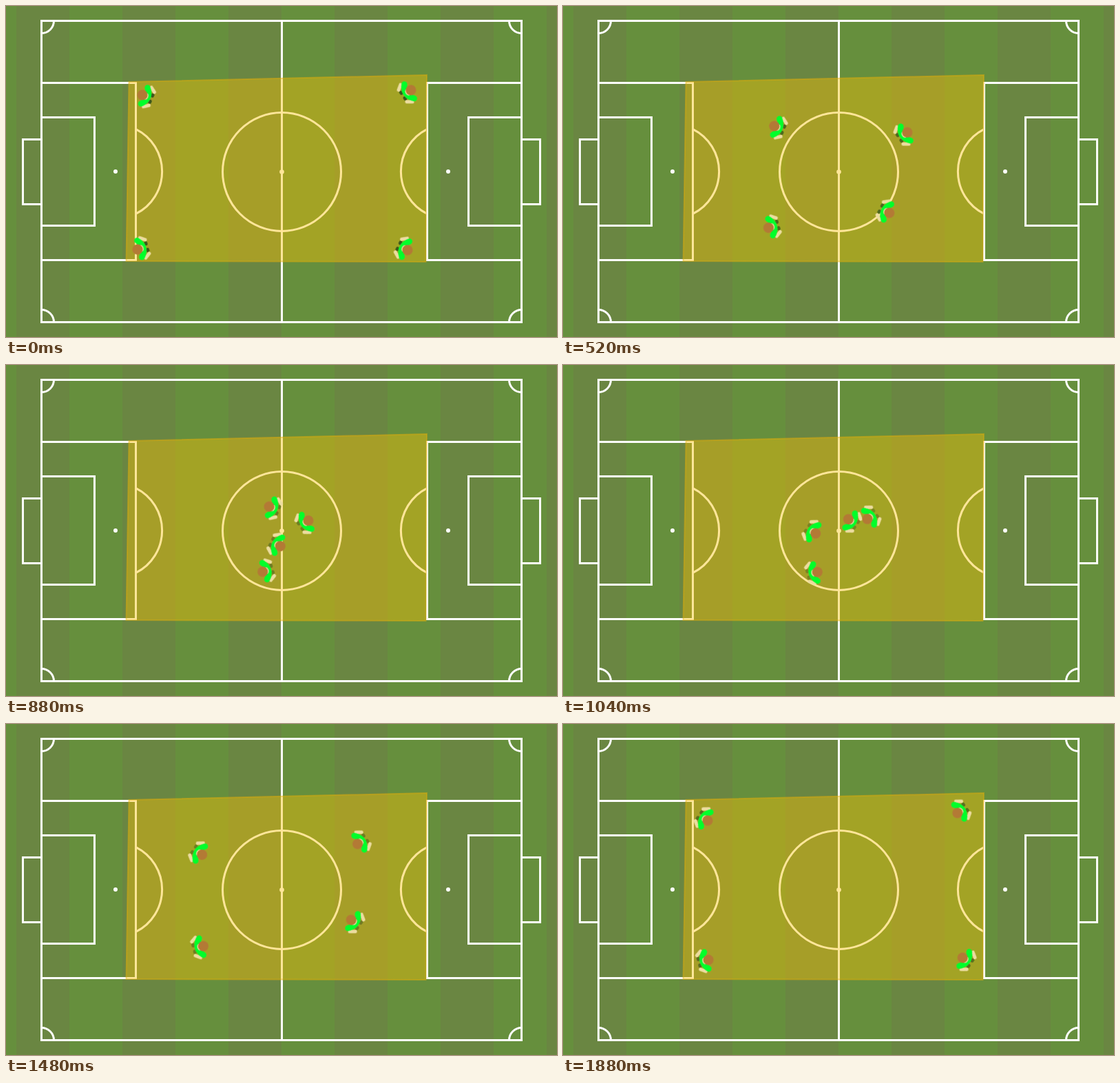
Recreate the animation shown at these times as an HTML page. Size 800 by 480 pixels, loop 1920 ms.

```html
<!DOCTYPE html>
<html lang="en">
<head>
<meta charset="utf-8">
<title>Crossing drill</title>
<style>
  html, body { margin: 0; width: 100%; height: 100%; overflow: hidden; background: #668f3d; }
  svg { display: block; width: 800px; height: 480px; }
  .lines { fill: none; stroke: #fff; stroke-width: 3; }
  .spots { fill: #fff; }
  .zone { fill: rgb(255 193 0 / .4); stroke: rgb(225 170 10 / .45); stroke-width: 2; }

  /* Each runner goes from --a to --b, then from --b to --c, 40 ms per step. */
  .runner { animation: run 1920ms steps(24) infinite; }
  @keyframes run {
    0%      { transform: translate(var(--a)) rotate(var(--r1)); }
    49.999% { transform: translate(var(--b)) rotate(var(--r1)); }
    50%     { transform: translate(var(--b)) rotate(var(--r2)); }
    100%    { transform: translate(var(--c)) rotate(var(--r2)); }
  }
  .feet { fill: #1f4519; animation: stride 640ms steps(8) infinite; }
  @keyframes stride {
    0%, 100% { opacity: .9; }
    50%      { opacity: .25; }
  }
  .arms { fill: none; stroke: #ecdca0; stroke-width: 5; stroke-linecap: round; }
  .shirt { fill: none; stroke: #00ff2a; stroke-width: 8.5; stroke-linecap: round; }
  .neck { fill: #ecdca0; }
  .head { fill: #b37a35; }

  .p1 { --a: 195.7px, 128px;   --b: 396.5px, 211.3px; --c: 586px, 343px;     --r1: 22.5deg;   --r2: 34.8deg; }
  .p2 { --a: 590px, 120.6px;   --b: 427.5px, 233.7px; --c: 577px, 126px;     --r1: 145.2deg;  --r2: -35.8deg; }
  .p3 { --a: 188.6px, 353.7px; --b: 386.8px, 295.6px; --c: 206px, 343.4px;   --r1: -16.3deg;  --r2: 165.2deg; }
  .p4 { --a: 585.2px, 355.1px; --b: 383.7px, 255.5px; --c: 204.6px, 136.4px; --r1: -153.7deg; --r2: -146.4deg; }
</style>
</head>
<body>
<svg viewBox="0 0 800 480">
  <defs>
    <pattern id="grass" x="15" width="154" height="480" patternUnits="userSpaceOnUse">
      <rect width="154" height="480" fill="#668f3d"/>
      <rect width="77" height="480" fill="#6a8642"/>
    </pattern>
    <g id="half">
      <path d="M51.5 111.5H188.5V368.5H51.5M51.5 161.5H128.5V318.5H51.5M51.5 193.5H24.5V287.5H51.5"/>
      <path d="M188.5 178.6A68.5 68.5 0 0 1 188.5 301.4"/>
      <path d="M69.5 21.5A18 18 0 0 1 51.5 39.5M51.5 440.5A18 18 0 0 1 69.5 458.5"/>
    </g>
    <g id="player">
      <g class="feet">
        <ellipse cx="16.5" cy="-5" rx="2.4" ry="3.2"/>
        <ellipse cx="16.5" cy="5" rx="2.4" ry="3.2"/>
      </g>
      <path class="arms" d="M10.5 -15L17 -10.5M10.5 15L17 10.5"/>
      <path class="shirt" d="M5.5 -12.5Q16.5 0 5.5 12.5"/>
      <ellipse class="neck" cx="8" rx="3.5" ry="5"/>
      <circle class="head" cx="2.5" r="7.6"/>
    </g>
  </defs>

  <rect width="800" height="480" fill="url(#grass)"/>
  <g class="lines">
    <rect x="51.5" y="21.5" width="697" height="437"/>
    <path d="M400.5 21.5V458.5"/>
    <circle cx="400.5" cy="240.5" r="86"/>
    <use href="#half"/>
    <use href="#half" transform="matrix(-1 0 0 1 800 0)"/>
  </g>
  <g class="spots">
    <circle cx="159" cy="240" r="3"/>
    <circle cx="400.5" cy="240.5" r="3.3"/>
    <circle cx="642" cy="240" r="3"/>
  </g>
  <path class="zone" d="M178.5 110L611 100L609.5 371L174.5 370Z"/>

  <g class="runner p1"><use href="#player"/></g>
  <g class="runner p2"><use href="#player"/></g>
  <g class="runner p3"><use href="#player"/></g>
  <g class="runner p4"><use href="#player"/></g>
</svg>
</body>
</html>
```
